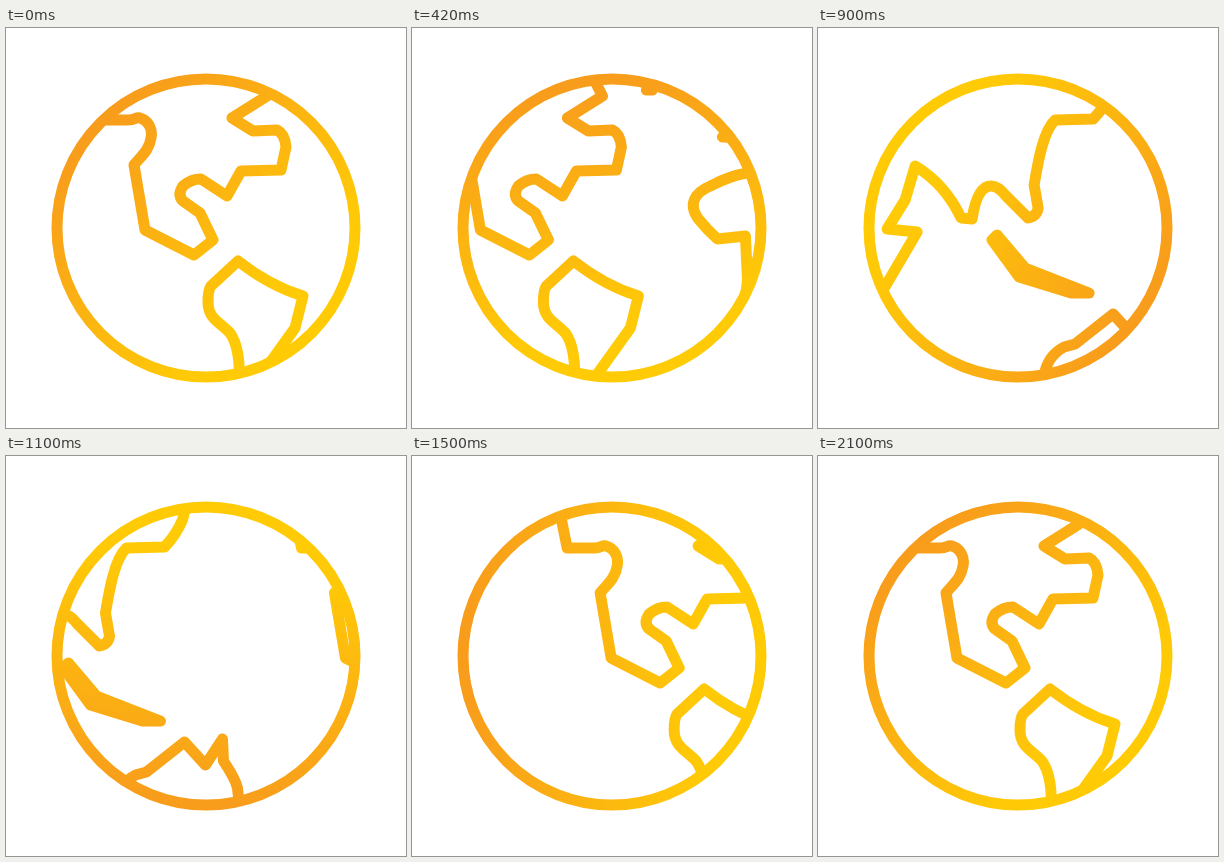
Animation, 400 px wide and 400 px high, one loop 2120 ms. Source, as an HTML page without scripts:

```html
<!DOCTYPE html>
<html lang="en">
<head>
<meta charset="utf-8">
<title>Turning globe</title>
<style>
  html, body { margin: 0; width: 100%; height: 100%; overflow: hidden; background: #fff; }
  svg { display: block; width: 100vw; height: 100vh; }
  .line { fill: none; stroke: #fff; stroke-width: 11; stroke-linecap: round; stroke-linejoin: round; }
  .map { animation: slide 2120ms infinite; }
  .tint { transform-origin: 200px 200px; animation: turn 2120ms infinite; }

  /* short rest, one turn in about 2 s, short rest */
  @keyframes slide {
    0% { transform: translateX(0); }
    4.245% { transform: translateX(0); animation-timing-function: cubic-bezier(.333, 0, .333, 1); }
    99.29%, 100% { transform: translateX(-711px); }
  }
  @keyframes turn {
    0% { transform: rotate(0deg); }
    4.245% { transform: rotate(0deg); animation-timing-function: cubic-bezier(.333, 0, .45, 1); }
    99.29%, 100% { transform: rotate(360deg); }
  }
</style>
</head>
<body>
<svg viewBox="0 0 400 400">
  <defs>
    <linearGradient id="gold" gradientUnits="userSpaceOnUse" x1="94" y1="94" x2="306" y2="306">
      <stop offset="0" stop-color="#f89c1c"/>
      <stop offset=".8" stop-color="#ffc907"/>
      <stop offset="1" stop-color="#ffcb05"/>
    </linearGradient>
    <clipPath id="disc"><circle cx="200" cy="200" r="152"/></clipPath>

    <g id="land">
      <!-- North America -->
      <path d="M87 52L95 92H122C130 92 129 89 134 90C142 92 147 101 145 110C143 123 135 128 128 137L139 202L188 227L207 212L194 185L177 173Q171 167 177 158Q185 151 195 151L221 168L235 143L275 142L280 119Q279 106 271 102L247 103L226 90L261 68L250 46"/>
      <path d="M305 62H311"/>
      <!-- South America -->
      <path d="M233 350C234 336 232 316 224 305C214 294 202 291 202 274Q202 262 205 258L232 233Q264 258 297 268L289 300L256 346"/>
      <!-- Africa, Europe and Asia -->
      <path d="M384 50L393 61L432 82L381 109L410 110L460 128L449 157Q438 163 431 157C422 151 419 145 409 145C398 145 380 152 369 158C352 165 347 177 357 191Q366 202 376 211L404 208L406 250Q406 266 400 274C406 286 413 299 424 305Q429 308 435 302Q447 284 459 262L493 204L463 201L481 172L491 138Q521 156 537 190L548 191Q553 158 567 158Q574 158 582 168L604 190Q613 188 614 180L610 157C613 140 618 104 631 92L669 91Q680 80 687 64L691 48"/>
      <path d="M460 54L472 73L496 64"/>
      <!-- southern islands -->
      <path d="M573 207L601 240L665 265H647L595 249L568 212Z"/>
      <path d="M620 348Q623 328 640 319L651 316L689 286L710 309L727 283L728 305Q740 323 742 332L744 350"/>
    </g>

    <mask id="ink" maskUnits="userSpaceOnUse" x="0" y="0" width="400" height="400">
      <g class="line">
        <g clip-path="url(#disc)">
          <g class="map">
            <use href="#land"/>
            <use href="#land" x="711"/>
          </g>
        </g>
        <circle cx="200" cy="200" r="149"/>
      </g>
    </mask>
  </defs>

  <g mask="url(#ink)">
    <circle class="tint" cx="200" cy="200" r="160" fill="url(#gold)"/>
  </g>
</svg>
</body>
</html>
```
